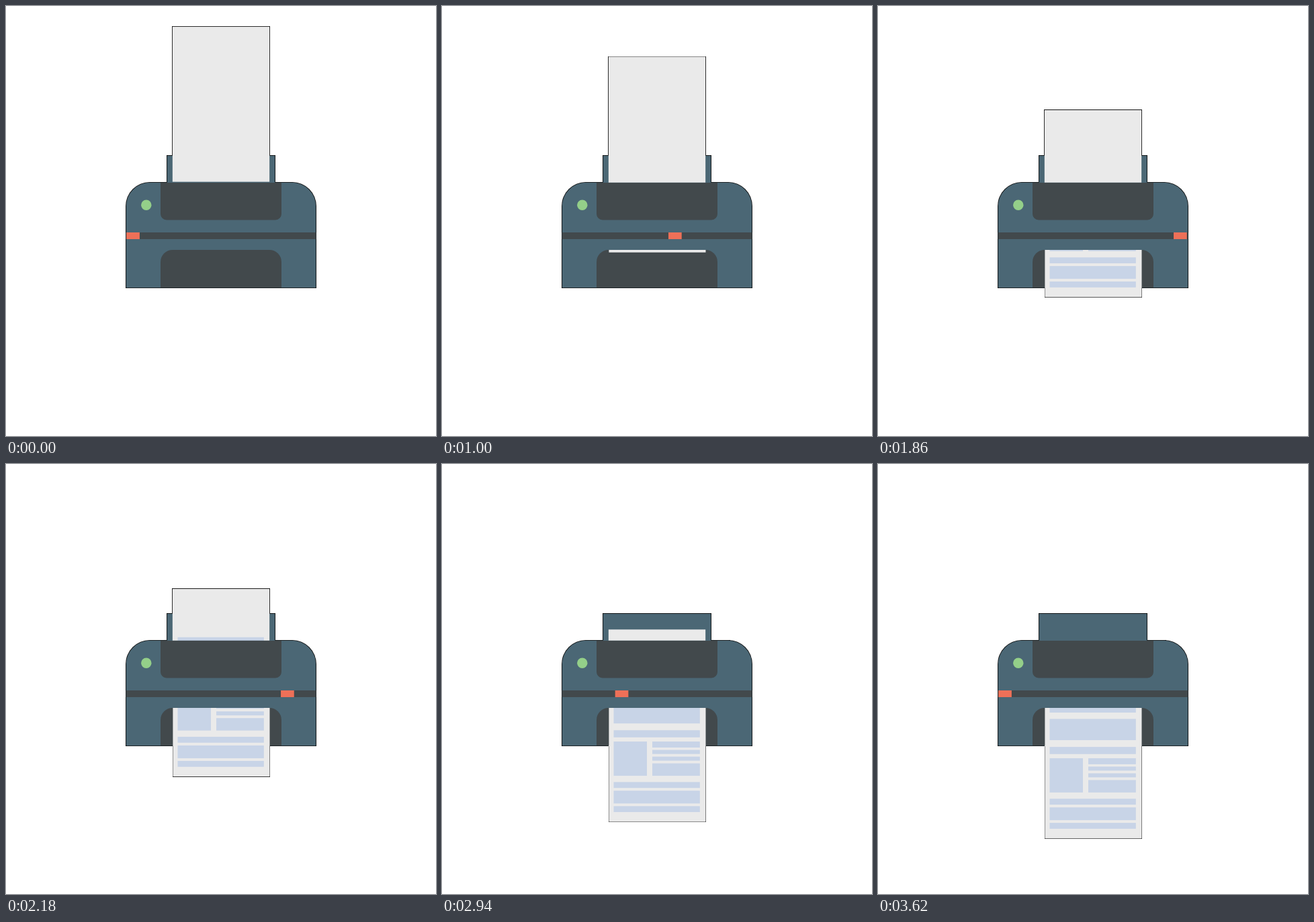
An HTML page for the animation above (3.64 s loop, 640 by 640 pixels).

```html
<!DOCTYPE html>
<html>
<head>
<meta charset="utf-8">
<title>Printer</title>
<style>
html, body { margin: 0; width: 100%; height: 100%; overflow: hidden; background: #fff; }
svg { display: block; width: 100vw; height: 100vh; }
.paper { fill: #eaeaea; }
.ink { fill: #c8d4e7; }
.body { fill: #4b6775; }
.dark { fill: #42494c; }
.edge { fill: #0a0a0a; }
</style>
</head>
<body>
<svg viewBox="0 0 640 640">
  <defs>
    <clipPath id="mouth"><rect x="240" y="363" width="160" height="277"/></clipPath>
    <clipPath id="below"><rect x="240" y="420" width="160" height="220"/></clipPath>
    <clipPath id="above"><rect x="240" y="0" width="160" height="222"/></clipPath>
  </defs>

  <path class="edge" d="M178 420V298A36 36 0 0 1 214 262H426A36 36 0 0 1 462 298V420Z"/>
  <rect class="edge" x="239" y="222" width="162" height="41"/>
  <rect class="body" x="239.85" y="222.85" width="160.3" height="41"/>

  <g clip-path="url(#above)"><rect id="feedEdge" class="edge" x="247" width="146" height="232"/></g>
  <rect id="feed" class="paper" x="247.85" width="144.3" height="230.8"/>
  <rect id="feedInk" class="ink" x="255.5" width="128.3" height="20"/>

  <path class="body" d="M178.85 419.15V298A35.2 35.2 0 0 1 214 262.85H426A35.2 35.2 0 0 1 461.15 298V419.15Z"/>
  <path class="dark" d="M230 263H410V309.5A9 9 0 0 1 401 318.5H239A9 9 0 0 1 230 309.5Z"/>
  <path class="dark" d="M230 419V381A18 18 0 0 1 248 363H392A18 18 0 0 1 410 381V419Z"/>
  <circle cx="208.8" cy="296.2" r="7.7" fill="#94cf89"/>
  <rect class="dark" x="178.5" y="337" width="283" height="10"/>
  <rect id="head" y="337" width="19.7" height="10" fill="#ee7058"/>

  <g clip-path="url(#below)"><rect id="sheetEdge" class="edge" x="248" width="145" height="300"/></g>
  <g clip-path="url(#mouth)">
    <g id="sheet"><rect class="paper" x="248.4" y="-300" width="144.1" height="300"/></g>
  </g>
</svg>
<script>
const LOOP = 3640, STEP = 20;
const $ = id => document.getElementById(id);
const set = (id, name, value) => $(id).setAttribute(name, value);

// Printed blocks: left, right, top and bottom, measured up from the sheet's lower edge
const L = 255.5, R = 383.8, M = 313;
const blocks = [
  [L, R, 207.4, 187.4], [L, R, 178, 146.4], [L, R, 136.3, 125.7],
  [L, 305, 119.5, 68.5],
  [M, R, 119.5, 110.5], [M, R, 107, 101], [M, R, 97, 91], [M, R, 87, 68.5],
  [L, R, 59.2, 50.4], [L, R, 46.3, 27.3], [L, R, 23.3, 14.5]
];
for (const [x1, x2, top, bottom] of blocks) {
  const r = document.createElementNS("http://www.w3.org/2000/svg", "rect");
  const box = { class: "ink", x: x1, y: -top, width: x2 - x1, height: top - bottom };
  for (const k in box) r.setAttribute(k, box[k]);
  $("sheet").append(r);
}

// Smooth 0..1 progress between two times
function ease(t, from, to) {
  const x = Math.min(1, Math.max(0, (t - from) / (to - from)));
  return x * x * (3 - 2 * x);
}

function draw(t) {
  const top = 30.85 + 236.4 * ease(t, 0, 3600);
  set("feed", "y", top);
  set("feedEdge", "y", Math.floor(top));

  const end = 357 + 200.4 * ease(t, 600, 3600);
  set("sheet", "transform", `translate(0 ${end})`);
  set("sheetEdge", "y", Math.ceil(end) - 300);
  set("feedInk", "y", end - 207.4);
  set("feedInk", "visibility", t >= 2140 ? "visible" : "hidden");

  set("head", "x", 179.2 + 262.3 * (ease(t, 0, 1760) - ease(t, 1780, 3600)));
}

const start = performance.now();
function tick() {
  const t = (performance.now() - start) % LOOP;
  draw(Math.floor(t / STEP) * STEP);
  requestAnimationFrame(tick);
}
tick();
</script>
</body>
</html>
```
